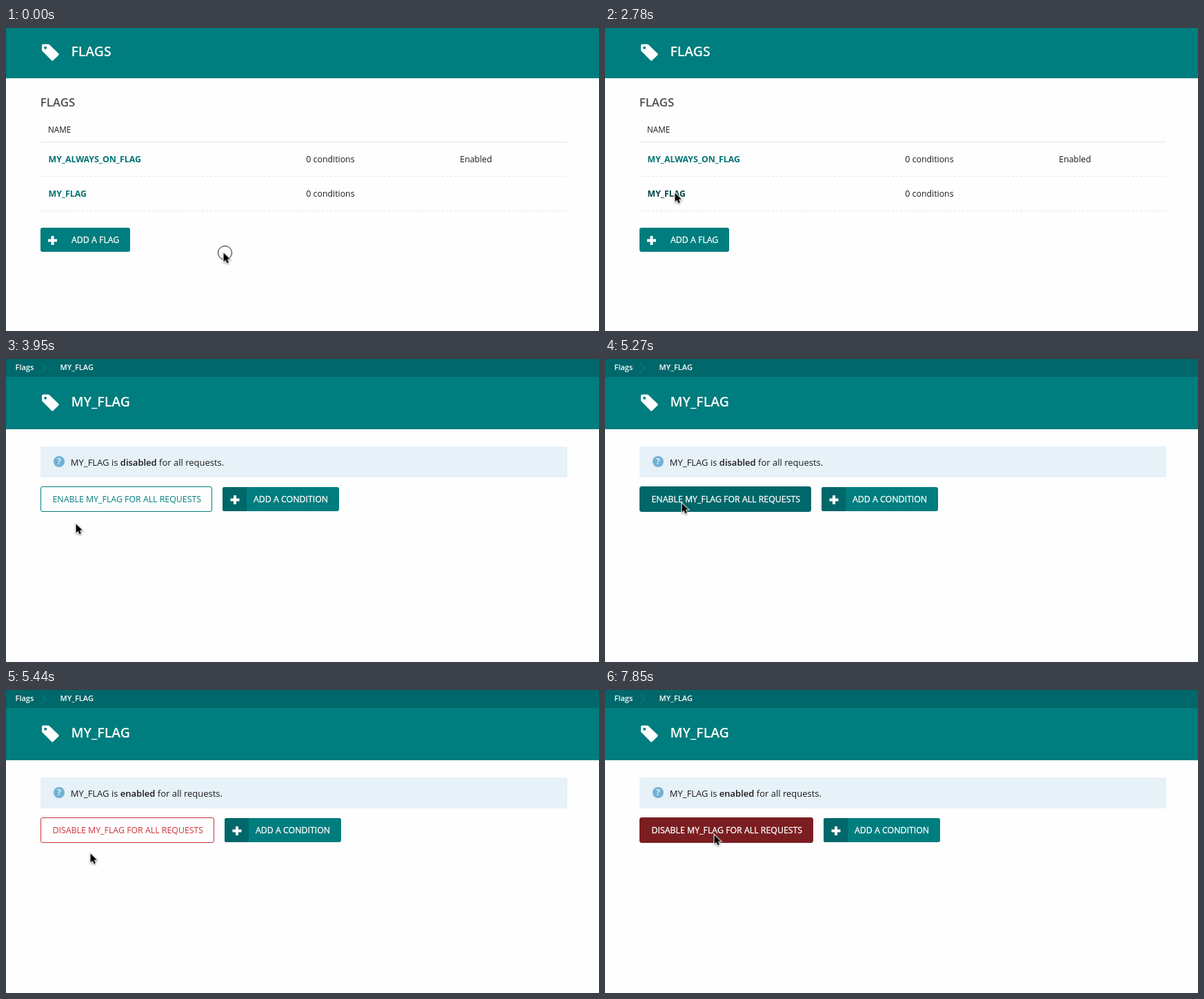
Animation of 860 by 440 pixels, one loop 8 s. Source, as an HTML page:

```html
<!DOCTYPE html>
<html lang="en">
<head>
<meta charset="utf-8">
<title>Flags</title>
<style>
  :root { --teal: #007d7e; --dark: #00676a; --red: #cd3238; --page: #fefefe; }
  html, body { margin: 0; width: 100%; height: 100%; overflow: hidden; background: #e4e4e4; }
  svg { display: block; width: 860px; height: 440px; }
  text { font: 12.35px "Open Sans", "Noto Sans", sans-serif; fill: #1a1a1a; white-space: pre; }

  .h1 { font-size: 19.5px; font-weight: 600; fill: #fff; }
  .h2 { font-size: 16.9px; font-weight: 600; fill: #4d4d4d; }
  .th { font-size: 11.7px; }
  .crumb { font-size: 11.05px; font-weight: 600; fill: #fff; }
  .info { font-size: 13px; }
  .info tspan { font-weight: 600; }
  .link { font-weight: 700; fill: #007273; }
  .label { fill: #fff; stroke: #fff; stroke-width: .3px; }
  .teal { fill: var(--teal); }
  .dark { fill: var(--dark); }
  .page { fill: var(--page); }
  .line { stroke: #e4e4e4; }
  .dash { stroke-dasharray: 3 3; }

  .toggle rect { fill: var(--page); stroke: var(--c); }
  .toggle text { fill: var(--c); stroke: none; stroke-width: .3px; }
  #off .toggle { --c: var(--teal); --hover: var(--dark); }
  #on .toggle { --c: var(--red); --hover: #7b1e21; }

  /* One clock: 8 s, hard cuts, 1% = 80 ms */
  #list, #detail, #off, #on, #ring, #cursor, #myflag, .toggle rect, .toggle text {
    animation: 8s step-end infinite;
  }
  #list { animation-name: list; }
  #detail { animation-name: detail; }
  #off { animation-name: off; }
  #on { animation-name: on; }
  #ring { animation-name: click; }
  #cursor { animation-name: move; }
  #myflag { animation-name: link; }
  #off rect.btn { animation-name: offBox; }
  #off text.btn { animation-name: offText; }
  #on rect.btn { animation-name: onBox; }
  #on text.btn { animation-name: onText; }

  @keyframes list { 0% { opacity: 1 } 35.875%, 100% { opacity: 0 } }
  @keyframes detail { 0%, 66.875% { opacity: 0 } 37%, 68%, 100% { opacity: 1 } }
  @keyframes off { 0%, 66.875%, 100% { opacity: 0 } 37% { opacity: 1 } }
  @keyframes on { 0% { opacity: 0 } 68%, 100% { opacity: 1 } }
  @keyframes click {
    0%, 32.625%, 63.75%, 96% { opacity: 1 }
    1.125%, 34.75%, 65.875%, 98.125%, 100% { opacity: 0 }
  }
  @keyframes link { 23.625%, 100% { fill: #004345 } }
  @keyframes offBox { 54.875%, 100% { fill: var(--hover); stroke: var(--hover) } }
  @keyframes offText { 54.875%, 100% { fill: #fff; stroke: #fff } }
  @keyframes onBox { 90.5%, 100% { fill: var(--hover); stroke: var(--hover) } }
  @keyframes onText { 90.5%, 100% { fill: #fff; stroke: #fff } }

  @keyframes move {
    0% { transform: translate(315.5px, 326.5px) }
    14.625% { transform: translate(311.5px, 325px) }
    15.75% { transform: translate(295px, 318px) }
    16.875% { transform: translate(264px, 305px) }
    18% { transform: translate(223px, 287px) }
    19.125% { transform: translate(182px, 270px) }
    20.25% { transform: translate(151px, 257px) }
    21.375% { transform: translate(130px, 248.5px) }
    22.5% { transform: translate(118px, 243.5px) }
    23.625% { transform: translate(109.5px, 240.5px) }
    24.75% { transform: translate(103.5px, 239.5px) }
    25.875% { transform: translate(101.5px, 239.5px) }
    50.5% { transform: translate(102.5px, 238.5px) }
    51.625% { transform: translate(103.5px, 235.5px) }
    52.75% { transform: translate(105.5px, 230.5px) }
    53.75% { transform: translate(107.5px, 224.5px) }
    54.875% { transform: translate(109.5px, 218.5px) }
    56% { transform: translate(110.5px, 213.5px) }
    57.125% { transform: translate(111.5px, 210.5px) }
    58.125% { transform: translate(111.5px, 209.5px) }
    66.875% { transform: translate(116.5px, 224.5px) }
    68% { transform: translate(122.5px, 237.5px) }
    69.125% { transform: translate(123.5px, 239.5px) }
    84.875% { transform: translate(124.5px, 239.5px) }
    87.125% { transform: translate(127.5px, 237.5px) }
    88.25% { transform: translate(133.5px, 232.5px) }
    89.375% { transform: translate(141.5px, 225.5px) }
    90.5% { transform: translate(149.5px, 218.5px) }
    91.5% { transform: translate(154.5px, 214.5px) }
    92.625% { transform: translate(157.5px, 211.5px) }
    93.75%, 100% { transform: translate(158.5px, 210.5px) }
  }
  #arrow { stroke: #fff; stroke-width: 2; paint-order: stroke; filter: drop-shadow(0 1px 1px rgba(0, 0, 0, .4)); }
</style>
</head>
<body>
<svg viewBox="0 0 860 440">
  <defs>
    <path id="tag" fill="#fff" fill-rule="evenodd" d="M54 23.5h7.2q1 0 1.8.7l13.2 12.9q1.2 1.2 0 2.4l-7.8 7.6q-1.2 1.2-2.4 0L52.7 33.6q-.7-.7-.7-1.8V25.500q0-2 2-2zM57.200 26.700a2 2 0 1 0 .01 0z"/>
    <path id="plus" fill="#fff" d="M-2-6.500h4v4.500h4.500v4h-4.500v4.500h-4v-4.500h-4.500v-4h4.500z"/>
    <g id="add">
      <rect class="teal" width="169" height="35" rx="3"/>
      <path class="dark" d="M3 0h32v35h-32q-3 0-3-3v-29q0-3 3-3z"/>
      <use href="#plus" x="18" y="18.500"/>
      <text class="label" x="45" y="22">ADD A CONDITION</text>
    </g>
  </defs>

  <g id="list">
    <rect class="page" width="860" height="440"/>
    <rect class="teal" width="860" height="73"/>
    <use href="#tag"/>
    <text class="h1" x="94.400" y="41">FLAGS</text>
    <text class="h2" x="49.700" y="114">FLAGS</text>
    <text class="th" x="61" y="152">NAME</text>
    <path class="line" d="M50 165.500H814"/>
    <text class="link" x="61.500" y="195">MY_ALWAYS_ON_FLAG</text>
    <text x="435.300" y="195">0 conditions</text>
    <text x="658.300" y="195">Enabled</text>
    <path class="line dash" d="M50 215.500H814M50 265.500H814"/>
    <text class="link" id="myflag" x="61.500" y="245">MY_FLAG</text>
    <text x="435.300" y="245">0 conditions</text>
    <rect class="teal" x="50" y="290" width="130" height="35" rx="3"/>
    <use href="#plus" x="67.500" y="308.500"/>
    <text class="label" x="95" y="312">ADD A FLAG</text>
  </g>

  <g id="detail">
    <rect class="page" width="860" height="440"/>
    <rect class="teal" width="860" height="102"/>
    <rect class="dark" width="860" height="26"/>
    <text class="crumb" x="13.500" y="16">Flags</text>
    <path d="M51 6.500l6.500 6.500-6.500 6.500" fill="none" stroke="#007d7e" stroke-width="1.500"/>
    <text class="crumb" x="78.500" y="16">MY_FLAG</text>
    <use href="#tag" y="28"/>
    <text class="h1" x="94.400" y="69">MY_FLAG</text>
    <rect x="50" y="127" width="764" height="45" rx="3" fill="#e6f1f8"/>
    <circle cx="77" cy="149" r="8" fill="#71b2d4"/>
    <text x="77" y="153.300" text-anchor="middle" style="font-weight:700;fill:#e6f1f8">?</text>
  </g>

  <g id="off">
    <text class="info" x="93.800" y="155">MY_FLAG is <tspan>disabled</tspan> for all requests.</text>
    <g class="toggle">
      <rect class="btn" x="50.500" y="185.500" width="248" height="36" rx="2.500"/>
      <text class="btn" x="67.500" y="208">ENABLE MY_FLAG FOR ALL REQUESTS</text>
    </g>
    <use href="#add" x="314" y="186"/>
  </g>

  <g id="on">
    <text class="info" x="93.800" y="155">MY_FLAG is <tspan>enabled</tspan> for all requests.</text>
    <g class="toggle">
      <rect class="btn" x="50.500" y="185.500" width="251" height="36" rx="2.500"/>
      <text class="btn" x="67.500" y="208">DISABLE MY_FLAG FOR ALL REQUESTS</text>
    </g>
    <use href="#add" x="317" y="186"/>
  </g>

  <g id="cursor">
    <g id="ring" fill="none">
      <circle cx="2" r="9" stroke="#fff"/>
      <circle cx="2" r="10" stroke="#000"/>
    </g>
    <path id="arrow" d="M0 0v13l3-2.800 2 4.800 2.400-1-2-4.700h4.100z"/>
  </g>
</svg>
</body>
</html>
```
